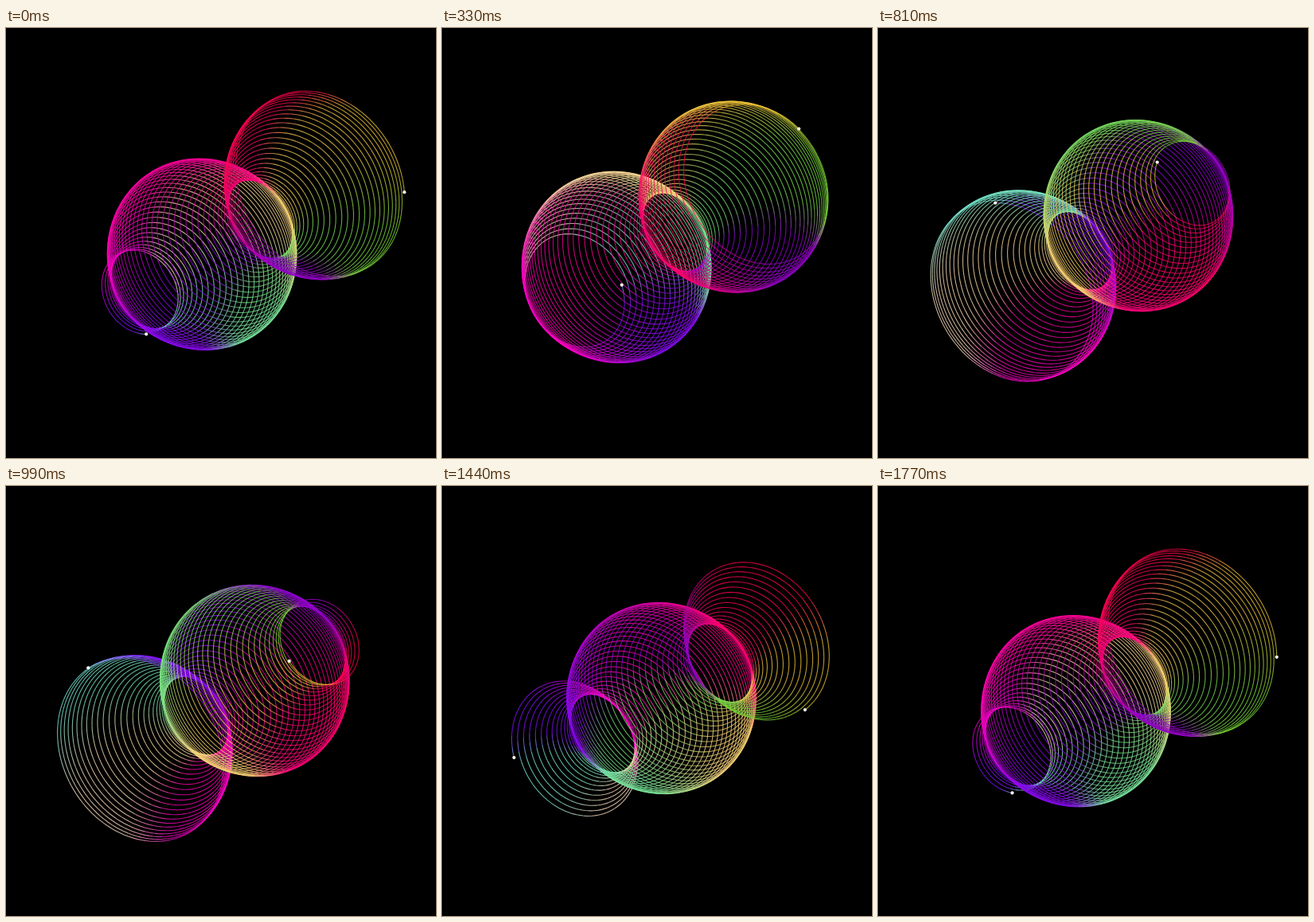
Write an HTML page with a canvas that moves like this. It is 540 px wide and 540 px high and loops after 1800 ms.

```html
<!DOCTYPE html>
<html>
<head>
<meta charset="utf-8">
<style>
html, body { margin: 0; width: 100%; height: 100%; overflow: hidden; background: #000; }
canvas { display: block; width: 540px; height: 540px; }
</style>
</head>
<body>
<canvas id="c" width="540" height="540"></canvas>
<script>
const ctx = document.getElementById('c').getContext('2d');
const LOOP = 1800, STEP = 30, RAD = Math.PI / 180;
const TURNS = 70, CHUNK = 9, SUB = 3;
const AX = 0.857, AY = 0.515, AXIS_P = 370.4;

const mix = (a, b, k) => a + (b - a) * k;

// Two circles of nearly equal frequency travel along a tilted axis;
// the large one turns with time, so their beat drifts.
const slow = s => -88 + s * (360 * TURNS + 124);
const fast = s => 106.3 + s * (360 * (TURNS - 1) - 76);

function point(s, turn) {
  const a = slow(s) * RAD, b = (fast(s) - turn) * RAD;
  const q = mix(-28, 238.8, s) + 27.7 * Math.cos(a) + 71.2 * Math.cos(b);
  const p = AXIS_P + 34 * Math.sin(a) + 87.4 * Math.sin(b);
  return [AX * q + AY * p, AX * p - AY * q];
}

// Colours around a ring, at the left and right ends of the axis
const LEFT = [[255, 225, 198], [120, 235, 220], [130, 15, 255], [255, 0, 210]];
const RIGHT = [[240, 195, 50], [120, 215, 50], [150, 0, 195], [255, 0, 75]];
const STOPS = [[-30, 0], [10, 0], [60, 1], [100, 1], [125, 2], [160, 2], [230, 3], [300, 3], [330, 0]];

// The colour belongs to the curve, so it turns along with it.
function color(s) {
  const a = ((fast(s) + 30) % 360 + 360) % 360 - 30;
  let i = 0;
  while (i < STOPS.length - 2 && a > STOPS[i + 1][0]) i++;
  const [a0, c0] = STOPS[i], [a1, c1] = STOPS[i + 1];
  const k = (a - a0) / (a1 - a0);
  const rgb = [0, 1, 2].map(n => Math.round(mix(
    mix(LEFT[c0][n], LEFT[c1][n], k),
    mix(RIGHT[c0][n], RIGHT[c1][n], k), s)));
  return `rgb(${rgb})`;
}

const COUNT = Math.round(TURNS * 360 / CHUNK);
const colors = Array.from({ length: COUNT }, (_, i) => color((i + 0.5) / COUNT));

function dot([x, y]) {
  ctx.beginPath();
  ctx.arc(x, y, 2.1, 0, 7);
  ctx.fill();
}

function draw(ms) {
  const turn = 360 * ms / LOOP;
  ctx.globalAlpha = 1;
  ctx.fillStyle = '#000';
  ctx.fillRect(0, 0, 540, 540);
  ctx.globalAlpha = 0.78;
  ctx.lineWidth = 1.1;
  colors.forEach((c, i) => {
    ctx.strokeStyle = c;
    ctx.beginPath();
    for (let j = 0; j <= SUB; j++) ctx.lineTo(...point((i + j / SUB) / COUNT, turn));
    ctx.stroke();
  });
  ctx.globalAlpha = 1;
  ctx.fillStyle = '#fffaf0';
  dot(point(0, turn));
  dot(point(1, turn));
}

const start = performance.now();
let last = -1;
function frame() {
  const t = Math.max(0, performance.now() - start) % LOOP;
  const ms = Math.floor(t / STEP) * STEP;
  if (ms !== last) draw(last = ms);
  requestAnimationFrame(frame);
}
frame();
</script>
</body>
</html>
```
